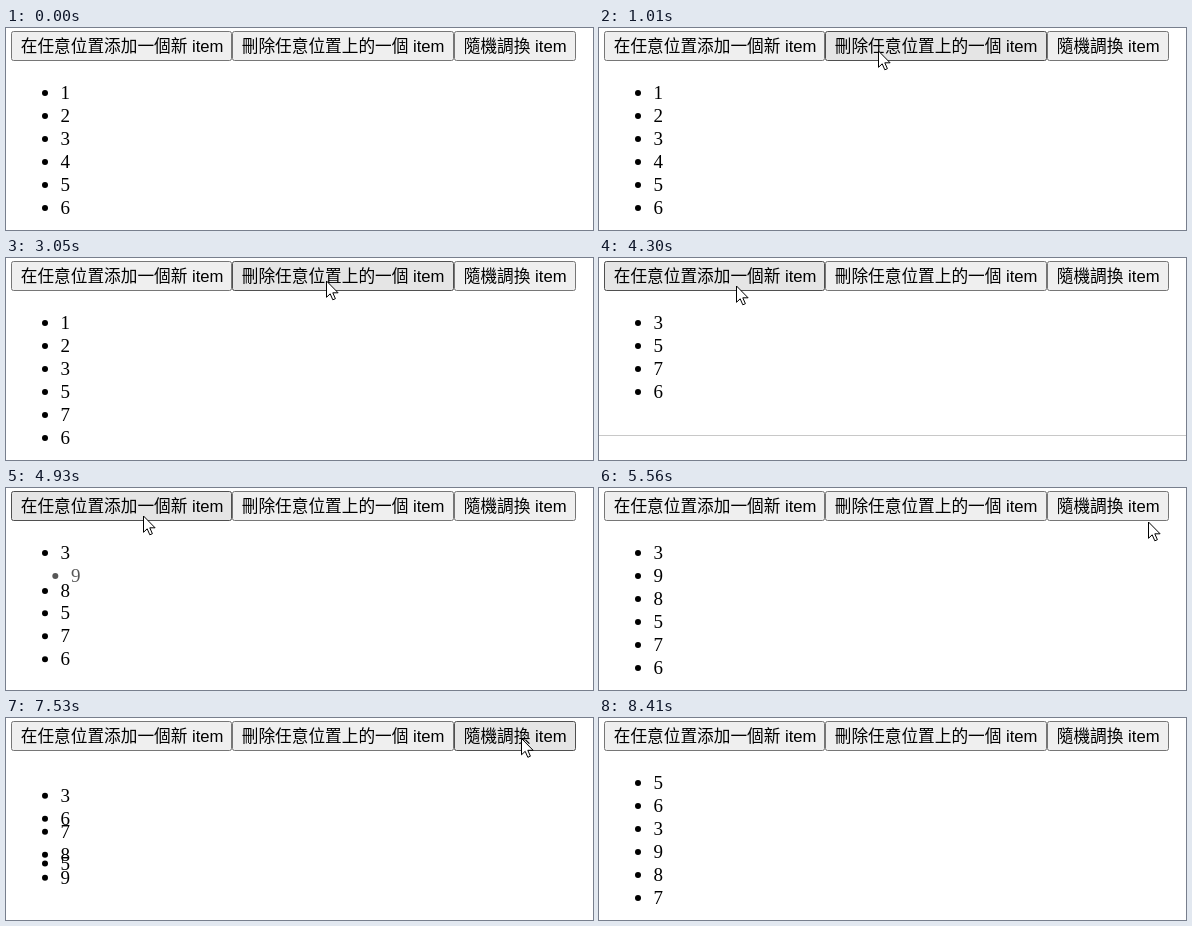
An HTML page for the animation above (8.74 s loop, 587 px wide and 202 px high).

```html
<!DOCTYPE html>
<html lang="zh-Hant">
<head>
<meta charset="utf-8">
<title>List transitions</title>
<style>
  html, body { margin: 0; width: 100%; height: 100%; overflow: hidden; background: #fff; }
  svg { display: block; }
  .label { font: 300 16.67px "Liberation Sans", Arial, "Noto Sans CJK TC", "Noto Sans CJK", sans-serif; }
  .item { font: 19px "Liberation Serif", "Times New Roman", serif; }
</style>
</head>
<body>
<svg id="stage" width="587" height="202" viewBox="0 0 587 202"></svg>
<script>
const LOOP = 8740, MOVE = 500, ROW = 23, SHIFT = 30, FONT = 16.67;
const START = "123456";
const stage = document.getElementById("stage");
const labels = ["在任意位置添加一個新 item", "刪除任意位置上的一個 item", "隨機調換 item"];

// Time of each click and the order it leads to
const clicks = [
  [1290, "12356"], [2450, "123576"],
  [3330, "23576"], [3600, "3576"],
  [4420, "38576"], [4740, "398576"],
  [6030, "536987"], [6600, "789536"], [7172, "365789"], [7395, "367895"], [7800, "563987"]
];

// Pointer glides: begin, end, x, y
const glides = [
  [130, 620, 188, 28],
  [820, 1010, 279.5, 23],
  [1600, 2000, 180, 27],
  [2550, 3050, 320.5, 23],
  [3700, 4150, 137.5, 28],
  [4950, 5560, 549.5, 34],
  [5640, 5900, 515.5, 20.5],
  [8200, 8410, 530, -25]
];

function set(el, attrs) {
  for (const k in attrs) el.setAttribute(k, attrs[k]);
}
function add(tag, attrs, parent = stage) {
  const el = document.createElementNS("http://www.w3.org/2000/svg", tag);
  set(el, attrs);
  return parent.appendChild(el);
}
const mix = (a, b, p) => a + (b - a) * p;

// cubic-bezier(.25, .1, .25, 1)
function ease(p) {
  if (p <= 0) return 0;
  if (p >= 1) return 1;
  const curve = (a, b, s) => 3 * a * s * (1 - s) ** 2 + 3 * b * s * s * (1 - s) + s ** 3;
  let lo = 0, hi = 1;
  for (let i = 0; i < 24; i++) {
    const mid = (lo + hi) / 2;
    if (curve(0.25, 0.25, mid) < p) lo = mid; else hi = mid;
  }
  return curve(0.1, 1, lo);
}

const line = add("rect", { x: 0, width: 587, height: 1, fill: "#c8c8c8" });

let edge = 5;
const buttons = labels.map(text => {
  const left = Math.floor(edge);
  const han = text.length - " item".length;
  edge += han * FONT + 55.1;
  const right = Math.floor(edge);
  const box = add("rect", { x: left + 0.5, y: 3.5, width: right - left - 1, height: 29, rx: 2 });
  add("text", { x: left + 9.8, y: 24, class: "label" }).textContent = text;
  return { left, right, box };
});

const rows = {};
for (const id of "123456789") {
  const g = rows[id] = add("g", {});
  add("circle", { cx: 39, cy: 64.9, r: 3 }, g);
  add("text", { x: 54.6, y: 71, class: "item" }, g).textContent = id;
}
const pointer = add("path", {
  d: "M0 0V16.3L3.7 12.8 6.3 18.8 8.9 17.7 6.3 11.8H11.6Z",
  fill: "#fff", stroke: "#000", "stroke-width": 1, "stroke-linejoin": "round"
});

const slotAt = (it, t) => mix(it.from, it.to, ease((t - it.start) / MOVE));

function listAt(t) {
  const items = {};
  let order = START;
  [...order].forEach((id, i) => items[id] = { from: i, to: i, start: 0, born: -MOVE });
  for (const [at, next] of clicks) {
    if (at > t) break;
    for (const id of order)
      if (!next.includes(id)) {
        const y = slotAt(items[id], at);
        Object.assign(items[id], { from: y, to: y, gone: at });
      }
    [...next].forEach((id, to) => {
      const it = items[id];
      if (it) Object.assign(it, { from: slotAt(it, at), to, start: at });
      else items[id] = { from: to, to, start: at, born: at };
    });
    order = next;
  }
  return { items, count: order.length };
}

function tipAt(t) {
  if (t < glides[0][0] || t >= glides.at(-1)[1]) return null;
  let x = 512, y = 196;
  for (const [begin, end, toX, toY] of glides) {
    const p = Math.min(1, Math.max(0, (t - begin) / (end - begin)));
    const e = p * p * (3 - 2 * p);
    x = mix(x, toX, e);
    y = mix(y, toY, e);
  }
  return { x, y };
}

function draw(t) {
  const { items, count } = listAt(t);
  set(line, { y: 177 + (count - 4) * ROW });
  for (const id in rows) {
    const it = items[id];
    let alpha = 0;
    if (it) {
      alpha = ease((t - it.born) / MOVE);
      if (it.gone) alpha *= 1 - ease((t - it.gone) / MOVE);
      set(rows[id], { transform: `translate(${(1 - alpha) * SHIFT} ${slotAt(it, t) * ROW})` });
    }
    set(rows[id], { opacity: alpha });
  }

  const tip = tipAt(t);
  const pressed = clicks.some(([at]) => t >= at - 70 && t < at);
  for (const { left, right, box } of buttons) {
    const over = tip && tip.x >= left && tip.x < right && tip.y >= 3 && tip.y < 33;
    const [fill, stroke] = !over ? ["#efefef", "#767676"]
      : pressed ? ["#f5f5f5", "#8d8d8d"] : ["#e5e5e5", "#4f4f4f"];
    set(box, { fill, stroke });
  }
  set(pointer, { visibility: tip ? "visible" : "hidden" });
  if (tip) set(pointer, { transform: `translate(${tip.x} ${tip.y})` });
}

const begin = performance.now();
function tick() {
  draw((performance.now() - begin) % LOOP);
  requestAnimationFrame(tick);
}
tick();
</script>
</body>
</html>
```
